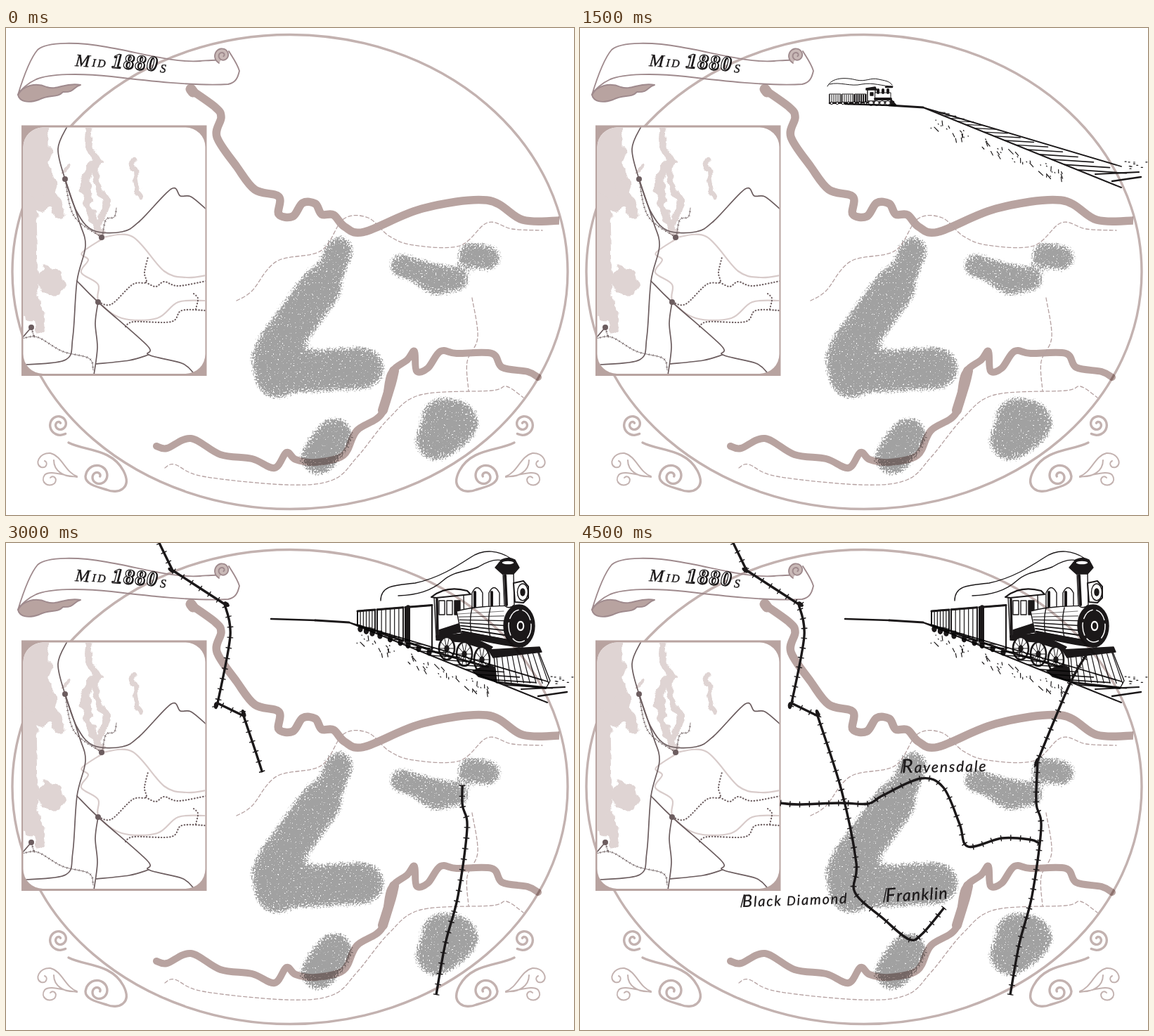
An HTML page that plays this animation: 808 px wide and 693 px high, repeating every 6.1 s.

```html
<!DOCTYPE html>
<html lang="en">
<head>
<meta charset="utf-8">
<title>Railway map, mid 1880s</title>
<style>
html, body { margin: 0; width: 100%; height: 100%; overflow: hidden; background: #fff; }
svg { display: block; width: 100%; height: 100%; }
path, ellipse, circle { stroke-linejoin: round; stroke-linecap: round; }
.ink { stroke: #1b1819; stroke-width: 1.4; }
.train { mix-blend-mode: multiply; }
.scroll { fill: none; stroke: #c3b2b0; stroke-width: 3.4; }
.hand { font-family: Lato, "Open Sans", sans-serif; font-style: italic; fill: #1b1819; stroke: #1b1819; stroke-width: .3; }
.serif { font-family: "Liberation Serif", serif; fill: #1b1819; stroke: #1b1819; stroke-width: .4; }
</style>
</head>
<body>
<svg viewBox="0 0 808 693" preserveAspectRatio="none">
<defs>
  <filter id="sponge" filterUnits="userSpaceOnUse" x="300" y="270" width="440" height="400">
    <feGaussianBlur in="SourceAlpha" stdDeviation="8" result="soft"/>
    <feTurbulence type="fractalNoise" baseFrequency=".45" numOctaves="2" seed="4" result="grain"/>
    <feComposite in="soft" in2="grain" operator="arithmetic" k1="2.3" k2="-.1"/>
    <feComponentTransfer result="mask"><feFuncA type="linear" slope="5" intercept="-2.1"/></feComponentTransfer>
    <feFlood flood-color="#a1a1a1"/>
    <feComposite in2="mask" operator="in"/>
  </filter>
  <filter id="coast" filterUnits="userSpaceOnUse" x="0" y="120" width="300" height="390">
    <feTurbulence type="fractalNoise" baseFrequency=".07" numOctaves="2" seed="3"/>
    <feDisplacementMap in="SourceGraphic" scale="16" xChannelSelector="R" yChannelSelector="G"/>
  </filter>
  <clipPath id="pane"><rect x="24.500" y="141.500" width="259" height="350.500" rx="28"/></clipPath>
  <g id="engine" class="ink"></g>
</defs>

<ellipse cx="404" cy="347" rx="395" ry="337.500" fill="none" stroke="#c3b2b0" stroke-width="3.400"/>
<g id="coal" filter="url(#sponge)"></g>
<g style="mix-blend-mode:multiply"><g id="rivers"></g></g>
<g id="trails"></g>

<g id="track" class="ink"></g>
<g id="side" class="ink train"></g>
<g id="mid" class="train"><use href="#engine" transform="translate(431 40) scale(.588 .545) translate(-499 -10)"/></g>
<g id="near" class="train"><use href="#engine"/></g>

<path fill="#b8a3a0" d="M22,138.500H285.500V495H22Z"/>
<rect x="24.500" y="141.500" width="259" height="350.500" rx="28" fill="#fff"/>
<g clip-path="url(#pane)"><g id="water" filter="url(#coast)"></g><g id="inset"></g></g>
<g id="towns" fill="#6c5d5f"></g>

<g fill="none" stroke="#9f8a8d" stroke-width="1.900">
  <path fill="#b8a3a0" d="M17,95C24,82 42,77 58,84C74,89 83,77 106,81C95,84 98,92 81,91C73,100 62,94 47,102C30,108 19,104 17,95Z"/>
  <path d="M17,95C24,72 33,45 45,31C58,19 105,20 143,27C190,35 240,50 276,47C290,46 298,45 304,46M317,33C323,43 329,51 332,61C330,70 327,78 316,80C270,83 200,75 150,69C105,64 62,65 43,73C32,78 21,87 17,95"/>
  <path id="curl" fill="#c9b9b7"/>
</g>
<g class="serif" transform="rotate(4.300 99 54)">
  <text x="98" y="54" font-size="25" font-style="italic">M</text>
  <text x="122" y="53" font-size="16" letter-spacing="2.500" font-style="italic">ID</text>
  <g font-size="29" font-weight="bold" font-style="italic" letter-spacing="2">
    <text x="151" y="52.500" stroke-width="1.800">1880</text>
    <text x="150" y="52" fill="#fff" stroke-width="1.200">1880</text>
  </g>
  <text x="219" y="54" font-size="17" font-style="italic">S</text>
</g>

<g id="scrolls" class="scroll">
  <path id="smallSwirl"/><path id="bigSwirl"/>
  <path stroke-width="2" d="M101,638C84,632 80,609 63,605C47,604 40,621 50,625C58,627 60,618 55,616M101,638C82,640 68,630 68,615M101,639C78,636 62,629 55,636C48,646 60,655 69,648C74,641 67,635 63,640"/>
</g>
<use href="#scrolls" transform="translate(812 0) scale(-1 1)"/>

<g id="rails" class="ink"></g>
<g id="labels" class="hand">
  <g transform="rotate(-1 456 327)"><text x="458" y="327" font-size="21" letter-spacing="1.900"><tspan font-size="27">R</tspan>avensdale</text><path d="M461,308L457,327" class="ink"/></g>
  <g transform="rotate(-2 228 518)"><text x="231" y="518" font-size="20" letter-spacing="1.800"><tspan font-size="24">B</tspan>lack <tspan font-size="18">D</tspan>iamond</text><path d="M234,501L229,518" class="ink"/></g>
  <g transform="rotate(-3 431 511)"><text x="435" y="511" font-size="23" letter-spacing="1.300"><tspan font-size="27">F</tspan>ranklin</text><path d="M437,492L432,511" class="ink"/></g>
</g>
</svg>
<script>
const NS = "http://www.w3.org/2000/svg";
const $ = id => document.getElementById(id);
const INK = "#1b1819", RIVER = "#b8a3a0", WATER = "#dfd4d3", DARK = "#6c5d5f";

function add(parent, tag, attrs) {
  const el = document.createElementNS(NS, tag);
  for (const k in attrs) el.setAttribute(k, attrs[k]);
  return parent.appendChild(el);
}

const points = s => s.split(" ").map(p => p.split(",").map(Number));
const mix = (a, b, u) => a.map((v, i) => v + (b[i] - v) * u);
const repeat = (n, fn) => { for (let i = 0; i < n; i++) fn(i, i / (n - 1)); };

let seed = 7;
const rnd = () => (seed = seed * 16807 % 2147483647) / 2147483647;

// Catmull-Rom through key points; a repeated point makes a corner
function spline(pts) {
  const at = i => pts[Math.max(0, Math.min(pts.length - 1, i))];
  let d = "M" + pts[0];
  for (let i = 0; i < pts.length - 1; i++) {
    const [a, b, c, e] = [at(i - 1), at(i), at(i + 1), at(i + 2)];
    const c1 = b.map((v, j) => v + (c[j] - a[j]) / 6);
    const c2 = c.map((v, j) => v - (e[j] - b[j]) / 6);
    d += `C${c1} ${c2} ${c}`;
  }
  return d;
}

const line = (g, s, color, width, dash = "none") => add(g, "path", {
  d: spline(points(s)), fill: "none", stroke: color, "stroke-width": width, "stroke-dasharray": dash
});

function spiral(cx, cy, r, start, turns) {
  const pts = [];
  repeat(24, (i, u) => {
    const a = start + u * turns * 2 * Math.PI, k = r * (1 - .85 * u);
    pts.push([cx + k * Math.cos(a), cy + k * Math.sin(a)]);
  });
  return spline(pts);
}

$("smallSwirl").setAttribute("d", spiral(76, 564, 16, 1, 1.7));
$("bigSwirl").setAttribute("d", "M89,590C112,602 150,598 167,630C180,655 160,664 143,657C125,652 113,648 113,638" + spiral(131, 638, 18, Math.PI, 1.5));
$("curl").setAttribute("d", spiral(308, 39, 12, 2, 1.8));

// Coal fields: broad dabs of the sponge
const dab = (s, width) => line($("coal"), s, "#000", width);
dab("474,316 460,350", 38);
dab("448,368 425,400 385,455", 58);
dab("380,470 385,496", 60);
dab("400,490 508,484", 58);
dab("562,338 600,350 642,358", 32);
dab("603,360 618,364", 32);
dab("660,323 686,327", 34);
dab("467,580 445,610", 50);
dab("620,556 642,562 612,586", 58);

// Rivers and trails
const rivers = $("rivers");
line(rivers, "263,88 298,113 306,127 300,155 328,197 354,230 388,240 388,265 408,268 422,249 440,250 449,265 466,266 482,283 510,290 592,257 684,245 735,273 787,274", RIVER, 11.5).style.strokeLinecap = "butt";
line(rivers, "263,87 266,91", RIVER, 15);
line(rivers, "214,595 229,598 263,584 305,607 350,613 382,626 399,604 412,614 440,618 480,608 499,573 535,548 547,493 571,472 581,460 584,488 600,484 618,460 641,463 691,463 706,483 742,489 757,497", RIVER, 10);
line(rivers, "536,544 548,505 552,488", RIVER, 14);
[
  "328,388 350,374 385,332 448,317 480,272 515,270 545,296 580,309 645,310 685,277 720,286 763,288",
  "663,384 671,440 656,475 658,516",
  "226,626 240,621 280,638 400,650 465,643 500,610 545,555 590,522 690,516 712,510 736,526"
].forEach(s => line($("trails"), s, "#b5a1a1", 1.3, "5 3.4"));

// Inset map: the coast filter roughens simple broad strokes into shores
const water = $("water");
line(water, "36,130 38,190 48,235", WATER, 50);
line(water, "58,225 76,262", WATER, 18);
line(water, "28,250 30,320 32,400", WATER, 30);
line(water, "62,357 66,366", WATER, 34);
line(water, "42,390 48,424", WATER, 17);
line(water, "119,140 117,165 128,188 112,220 124,272 136,295", WATER, 11);
line(water, "128,188 128,220 144,243 134,275", WATER, 9);
line(water, "182,188 184,220 192,240", WATER, 9);
line(water, "87,196 85,204", WATER, 7);

const inset = $("inset");
[
  "137,298 180,297 225,346 257,355 285,352",
  "137,300 108,320 117,330 107,348 131,365 132,389 165,413 215,413 245,390 285,388"
].forEach(s => line(inset, s, "#d8cbca", 2.2));
[
  "132,390 150,393 180,365 199,362 197,348 202,326",
  "199,362 213,368 225,361 245,367 285,360",
  "170,425 182,418 235,418 250,402 285,402",
  "267,378 273,385 270,400"
].forEach(s => line(inset, s, DARK, 2.1, ".5 3.6"));
[
  "87,140 74,172 84,215 101,262 124,288 165,290 190,275 235,229 248,239 263,240 285,258",
  "84,215 104,275 113,310 101,360 95,440 85,472 28,479",
  "101,360 131,390 201,452 203,465 250,477 266,490",
  "131,390 127,420 130,455 125,494",
  "128,478 175,473 203,465",
  "36,426 23,441"
].forEach(s => line(inset, s, DARK, 1.7));
[
  "84,215 97,268 137,298",
  "137,298 142,273 154,269 157,256",
  "23,442 45,440 80,460 118,470 124,487",
  "36,426 40,440"
].forEach(s => {
  line(inset, s, DARK, .8);
  line(inset, s, DARK, 3, ".8 5").style.strokeLinecap = "butt";
});
points("84,215 136,298 131,390 36,426").forEach(([cx, cy]) => add($("towns"), "circle", { cx, cy, r: 4 }));

// Track in perspective, with grass below it
const track = $("track");
const nearRail = t => [488 + 282 * t, 113 + 114 * t];
const farRail = t => [488 + 282 * t, 113 + 84 * t];
const stroke = (g, a, b, w) => add(g, "path", { d: `M${a}L${b}`, "stroke-width": w });
stroke(track, [377, 108], [440, 110], 2.4);
stroke(track, [440, 110], [488, 113], 3);
stroke(track, nearRail(0), nearRail(1), 2);
stroke(track, farRail(0), farRail(1), 1.8);
repeat(16, (i, u) => {
  const t = .06 + .72 * u ** 1.4, [x, y] = nearRail(t);
  stroke(track, [x, y], [x + 10 + 76 * t, y + 6 * t], 1 + t);
});
stroke(track, [733, 208], [795, 205], 2.2);
stroke(track, [757, 218], [798, 212], 2.4);
repeat(52, () => {
  const t = .04 + .66 * rnd(), [x, y] = nearRail(t);
  const py = y + 8 + 18 * rnd(), len = rnd() < .45 ? 1 : 3 + 6 * rnd();
  stroke(track, [x, py], [x + len * (rnd() - .1), py + len * .8], 1.2);
});
repeat(10, () => {
  const x = 775 + 30 * rnd(), y = 190 + 11 * rnd();
  stroke(track, [x, y], [x + 2, y], 1.2);
});

// Pen helpers for the two trains
const pen = g => ({
  shape: (d, fill = "#fff", w = 1.4) => add(g, "path", { d, fill, "stroke-width": w }),
  oval: (cx, cy, rx, ry, fill = "#fff", w = 1.4, stroke = INK) =>
    add(g, "ellipse", { cx, cy, rx, ry, fill, stroke, "stroke-width": w }),
  bar: (a, b, w = 1.2) => stroke(g, a, b, w)
});

function drawEngine() {
  const { shape, oval, bar } = pen($("engine"));
  shape("M533,82C533,58 560,60 582,57C615,50 640,34 660,21C680,7 702,11 718,22M558,75C592,74 610,64 621,54C638,39 656,41 672,34C688,24 700,22 710,26", "none");

  // Wagons and tender grow towards the viewer
  const top = x => [x, 97 - (x - 500) * .08], base = x => [x, 117 + (x - 500) * .34];
  [[500, 525], [528, 565], [568, 606]].forEach(([a, b], n) => {
    shape(`M${top(a)}L${top(b)} ${base(b)} ${base(a)}Z`, "#fff", 2);
    bar(top(a), top(b), 3);
    bar(base(a), base(b), 3);
    if (n < 2) repeat(7, (i, u) => bar(top(a + (b - a) * u), base(a + (b - a) * u)));
    else bar(top(a + 4), base(a + 4), 6);
    repeat(3, (i, u) => {
      const [x, y] = base(a + 4 + (b - a - 8) * u);
      oval(x, y + 4, 3, 4, INK);
    });
  });

  // Cab
  shape("M609,77L651,73L652,125L612,134Z");
  repeat(3, i => shape(`M${616 + 11 * i},82h8v20h-8Z`, i < 2 ? "#fff" : INK));
  shape("M616,124L650,113V126L616,133Z", INK);
  bar([613, 80], [614, 131], 3.5);
  shape("M605,77Q626,60 656,68L661,73L612,78Z", "#fff", 2.2);

  // Boiler, domes and bands
  repeat(2, i => {
    const x = 663 + 24 * i;
    shape(`M${x},93V71Q${x + 7},56 ${x + 15},71V93Z`);
    bar([x + 4, 70], [x + 4, 92], 4);
  });
  shape("M641,97C670,89 700,90 730,89L735,148C700,143 670,138 648,131Z");
  repeat(7, (i, u) => bar(mix([643, 101], [649, 126], u), mix([708, 97], [711, 138], u), .6 + u * 1.8));
  repeat(2, i => shape(`M${663 + 26 * i},92q-5,20 0,43`, "none"));
  shape("M649,126L716,138L730,148C700,144 670,138 649,131Z", INK);

  // Smokestack, lamp and front
  shape("M707,43L709,89Q716,95 723,88L722,43Z");
  bar([710, 46], [712, 88], 4);
  shape("M696,35L705,24Q715,19 724,24L730,35L722,44H706Z", INK);
  oval(714, 28, 9, 3);
  shape("M722,57L736,54L743,62V78L736,85L724,84Z", "#fff", 2);
  oval(735, 70, 7.5, 12);
  oval(735, 70, 3, 5, INK);
  oval(730, 118, 22, 30, INK);
  oval(731, 118, 16, 23, "none", 1.5, "#fff").setAttribute("stroke-dasharray", "18 6");
  oval(732, 118, 6, 8);
  oval(732, 118, 2.5, 4, INK);

  // Running gear
  shape("M612,132L652,129L692,148L688,153L650,141L612,138Z", INK);
  repeat(3, i => {
    const cx = 627 + 25 * i, cy = 150 + 8 * i, ry = 16 + i;
    oval(cx, cy, 11, ry, "#fff", 2.6);
    repeat(10, k => {
      const a = k * Math.PI / 5;
      bar([cx, cy], [cx + 10 * Math.cos(a), cy + (ry - 1) * Math.sin(a)], 1);
    });
    oval(cx, cy, 3, 4, INK);
  });
  bar([603, 153], [690, 178], 3);
  shape("M664,182L686,173L702,180V199L672,190Z", INK);

  // Cowcatcher
  shape("M694,160L757,153L774,196L768,207L698,198Z");
  repeat(9, (i, u) => bar(mix([698, 161], [756, 154], u), mix([701, 198], [772, 200], u)));
  bar([698, 198], [768, 206], 3);
  shape("M686,152L759,148L762,155L693,163Z", INK);
}

function drawSide() {
  const { shape, oval, bar } = pen($("side"));
  shape("M352,83C358,70 378,70 393,74C407,77 413,70 425,73C433,75 440,75 444,81M355,80C370,76 385,84 401,80C417,77 430,83 445,83", "none", 1);
  repeat(3, n => {
    const x = 355 + 18 * n;
    shape(`M${x},94h16v12h-16Z`, "#fff", 1);
    repeat(6, i => bar([x + 3 * i, 95], [x + 3 * i, 105], n < 2 ? 1 : 2));
  });
  shape("M409,87h11v17h-11Z");
  shape("M407,86L420,84L422,88H407Z", INK);
  shape("M413,92h4v4h-4Z", INK);
  shape("M420,92H442V101H420Z", "#fff", 1);
  repeat(3, i => bar([424 + 7 * i, 92], [424 + 7 * i, 88], 4));
  bar([435, 84], [444, 84], 2.5);
  bar([420, 101], [442, 101], 4);
  bar([355, 107], [446, 105], 2.5);
  repeat(11, i => oval(358 + 8 * i, 107, i > 6 ? 3.4 : 1.8, i > 6 ? 3.4 : 1.8, "#fff", 1));
  shape("M442,101L450,110H442Z", INK);
}
drawEngine();
drawSide();

// Railways: each step draws part of a line with its own tie spacing
const west = points("218,0 237,39 237,39 311,87 311,87 319,132 301,228 301,228 338,246 338,246 372,352 393,455 391,497 432,535 468,564 487,556 518,519");
const east = points("612,643 625,570 643,502 656,405 649,370 651,310 651,310 697,200 725,152");
const branch = points("653,427 640,422 600,420 552,432 540,400 517,348 485,335 431,359 410,371 370,370 310,372 285,370");

function rail(g, pts, part, gap) {
  const p = add(g, "path", { d: spline(pts), fill: "none", "stroke-width": 3.4 });
  const full = p.getTotalLength(), len = full * part;
  p.setAttribute("stroke-dasharray", `${len} ${full + 9}`);
  p.style.strokeLinecap = "butt";
  repeat(Math.round(len / gap) + 1, (i, u) => {
    const s = len * u;
    const a = p.getPointAtLength(Math.max(0, s - 1)), b = p.getPointAtLength(Math.min(full, s + 1));
    const k = 3.8 / Math.hypot(b.x - a.x, b.y - a.y);
    const nx = (a.y - b.y) * k, ny = (b.x - a.x) * k, x = (a.x + b.x) / 2, y = (a.y + b.y) / 2;
    stroke(g, [x - nx, y - ny], [x + nx, y + ny], 1.4);
  });
}

const LOOP = 6100;
const parts = [];
const show = (el, from, to = LOOP) => parts.push({ el, from, to });

function railStep(from, to, lines, part, gap) {
  const g = add($("rails"), "g", {});
  lines.forEach(pts => rail(g, pts, part, gap));
  show(g, from, to);
}
railStep(2500, 3000, [west, east], .275, 17);
railStep(3000, 3500, [west, east], .57, 15);
railStep(3500, 3700, [west, east], 1, 14.5);
railStep(3700, LOOP, [west, east], 1, 14);
railStep(3900, 4100, [branch], .665, 15);
railStep(4100, 4300, [branch], 1, 15);
railStep(4300, LOOP, [branch], 1, 14);
show($("track"), 500);
show($("side"), 1000, 2000);
show($("mid"), 2000, 2500);
show($("near"), 2500);
show($("labels"), 4500);

function draw(t) {
  for (const { el, from, to } of parts) el.style.display = t >= from && t < to ? "" : "none";
  $("side").setAttribute("transform", `translate(${t < 1500 ? -41 : 0} 0)`);
}

function tick() {
  draw(performance.now() % LOOP);
  requestAnimationFrame(tick);
}
tick();
</script>
</body>
</html>
```
